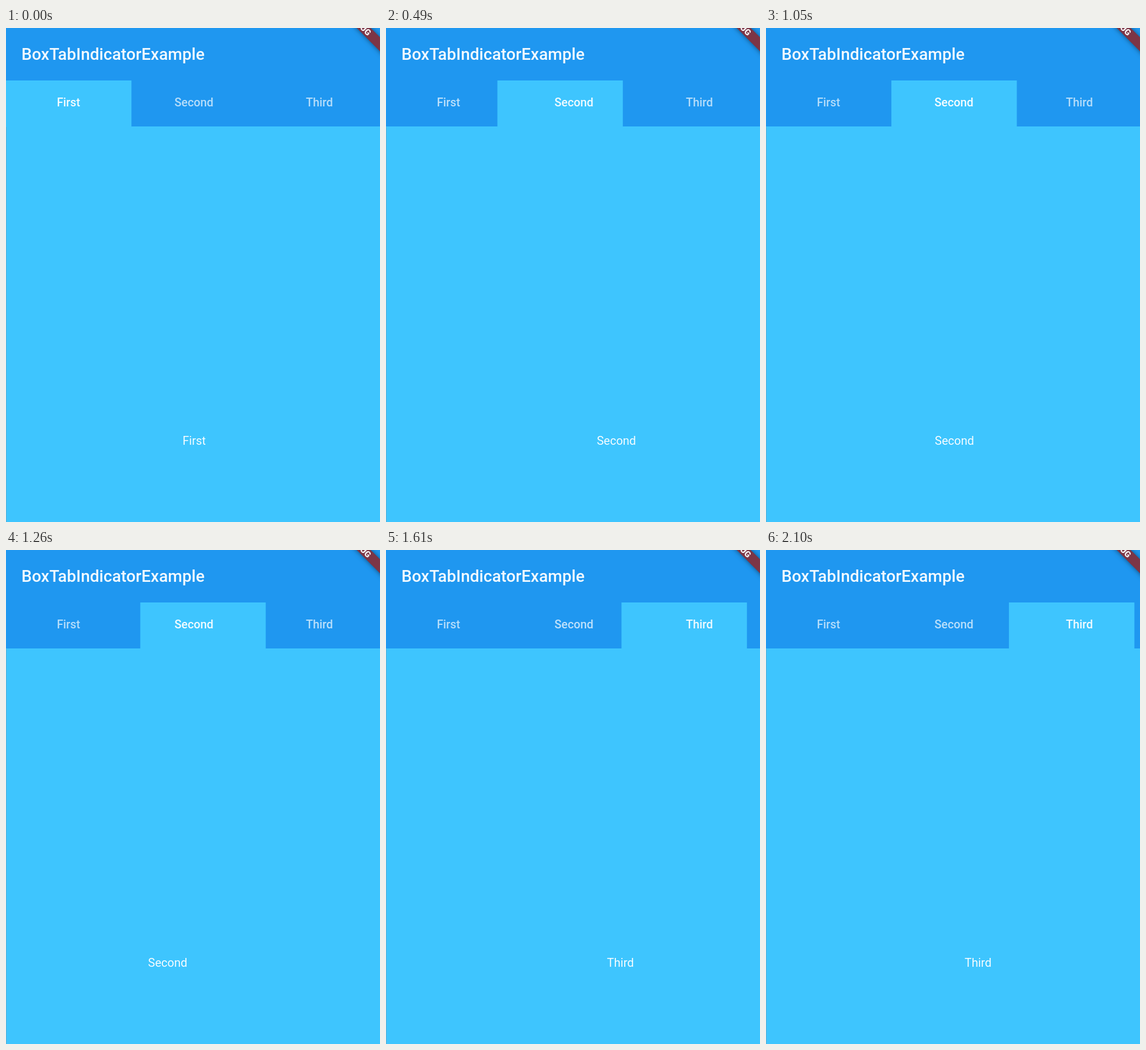
Recreate the animation shown at these times as an HTML page with a canvas. Size 636 px wide and 838 px high, loop 2170 ms.

```html
<!DOCTYPE html>
<html lang="en">
<head>
<meta charset="utf-8">
<title>Box tab indicator</title>
<style>
html, body { margin: 0; width: 100%; height: 100%; overflow: hidden; background: #3ec5fe; }
canvas { display: block; }
</style>
</head>
<body>
<canvas id="stage" width="636" height="838"></canvas>
<script>
const ctx = document.getElementById('stage').getContext('2d');
const LOOP = 2170, STEP = 70;
const PAGE = 640, TAB = PAGE / 3;
const BAR = '#1f97f0', BOX = '#3ec5fe';
const LABELS = ['First', 'Second', 'Third'];
const DRAG = 210, SPEED = 2.2;      // ms, pages per second at release
const SLOW = -9.08, FAST = -22.03;  // decay rates of the page spring

// Progress of one swipe: finger drag up to `reach`, then an overdamped spring to 1.
function swipe(ms, reach) {
  if (ms <= 0) return 0;
  if (ms < DRAG) {
    const s = ms / DRAG, v = SPEED * DRAG / 1000;
    return reach * s * s * (3 - 2 * s) + v * s * s * (s - 1);
  }
  const t = (ms - DRAG) / 1000, rest = 1 - reach;
  const b = (SPEED + SLOW * rest) / (SLOW - FAST);
  return 1 - (rest - b) * Math.exp(SLOW * t) - b * Math.exp(FAST * t);
}

function pageAt(t) {
  return swipe(t - 70, 0.448) + swipe(t - 1190, 0.404) - swipe(t - 2038, 0.43);
}

function rect(color, x, y, w, h) {
  ctx.fillStyle = color;
  ctx.fillRect(x, y, w, h);
}

function text(str, x, y, font, align, alpha = 0.95) {
  ctx.font = font + ' Roboto, sans-serif';
  ctx.textAlign = align;
  ctx.fillStyle = `rgba(255,255,255,${alpha})`;
  ctx.fillText(str, x, y);
}

function banner() {
  ctx.save();
  ctx.translate(602.3, -6);
  ctx.rotate(Math.PI / 4);
  ctx.shadowColor = 'rgba(0,0,0,0.5)';
  ctx.shadowBlur = 8;
  rect('#7c3546', -60, -8.4, 130, 16.8);
  ctx.shadowColor = 'transparent';
  text('DEBUG', 0, 5.1, '900 14.3px', 'center');
  ctx.restore();
}

function draw(t) {
  const page = pageAt(t);
  rect(BOX, 0, 0, 636, 838);
  rect(BAR, 0, 0, 636, 167);
  rect(BOX, page * TAB, 89, TAB, 79);
  rect('rgba(110,150,170,0.45)', 0, 168, 1, 670);

  text('BoxTabIndicatorExample', 26.2, 53.7, '500 28px', 'left');
  LABELS.forEach((label, i) => {
    const near = Math.max(0, 1 - Math.abs(page - i));
    text(label, TAB * (i + 0.5) - 0.4, 133, '500 19.8px', 'center', 0.67 + 0.28 * near);
    text(label, PAGE * (i + 0.5 - page), 707, '400 20px', 'center');
  });
  banner();
}

const start = performance.now();
function tick() {
  const t = (performance.now() - start) % LOOP;
  draw(Math.floor(t / STEP) * STEP);
  requestAnimationFrame(tick);
}
tick();
</script>
</body>
</html>
```
